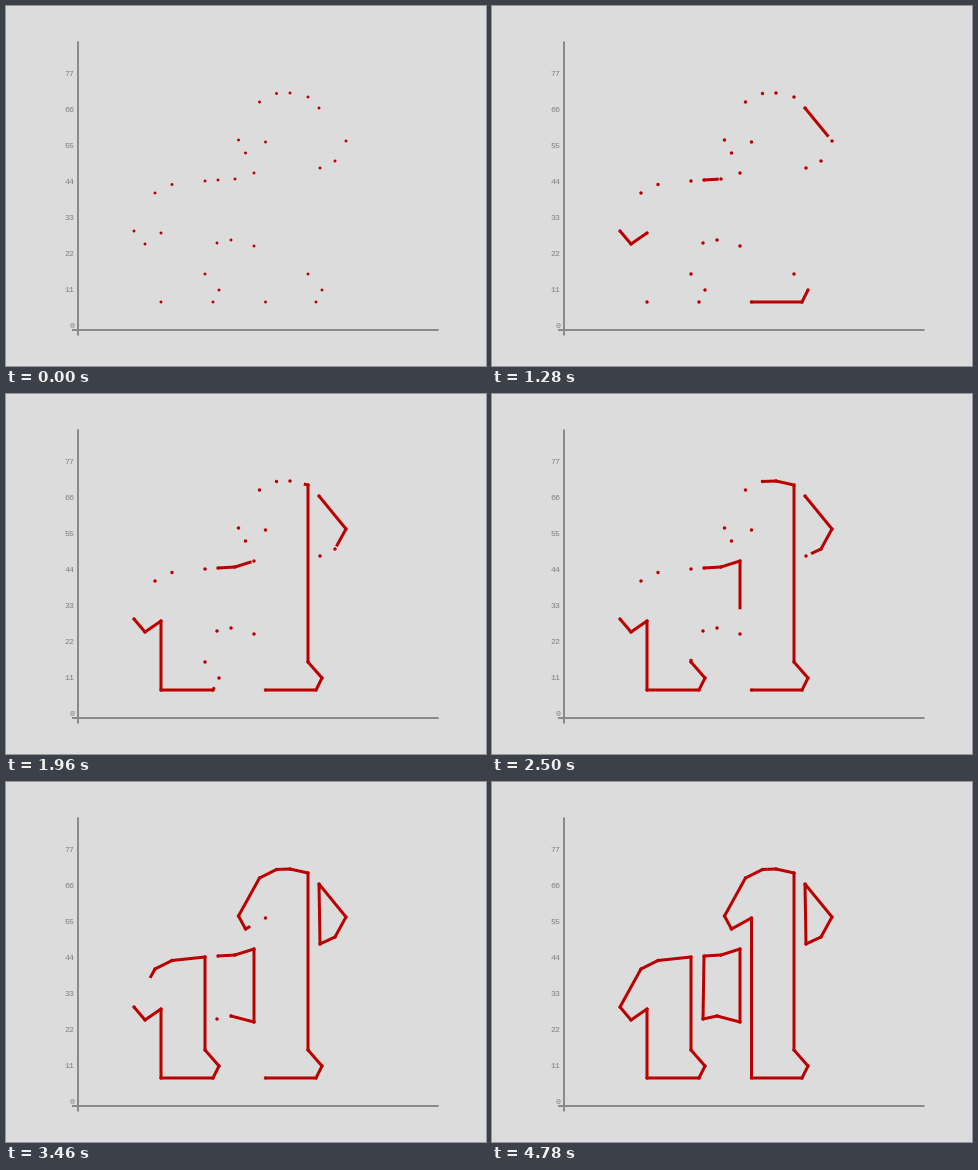
Write a matplotlib script that moves like this. It is 480x360 px and loops after 6000 ms.

```python
import matplotlib.pyplot as plt
import numpy as np
from matplotlib.animation import FuncAnimation

WIDTH, HEIGHT, DPI = 480, 360, 72
INTERVAL, LOOP = 20, 6000
START = 34.5  # frames before the drawing begins
GROW = 2      # frames before the dots swell
FLOOR = 296
RED, AXIS, LABEL, PAPER = "#bb0000", "#8a8a8a", "#808080", "#dcdcdc"


def numeral_one(left, stem, neck, chin, crown):
    """Corners of a 1 with a hooked head, from the bottom left corner."""
    foot = [(left, FLOOR), (stem + 8, FLOOR), (stem + 14, FLOOR - 12),
            (stem, FLOOR - 28)]
    top = [(stem + dx, neck - dy) for dx, dy in crown]
    tip = np.array([left - 27, neck - 2])
    head = [tip + (38, -46.5), tip + (21, -38), tip, tip + (chin, 13)]
    return np.array([*foot, *top, *head, (left, neck)], float)


small_one = numeral_one(155, 199, 227, 11, [(0, 52)])
tall_one = numeral_one(259.5, 302, 136, 7, [(0, 45), (-18, 49)])
ribbon = np.array([(212, 174), (229, 173), (248, 167),
                   (248, 240), (225, 234), (211, 237)], float)
wing = np.array([(313, 102), (340, 135), (329, 155), (314, 162)], float)

# (corners in drawing order, frames per edge)
OUTLINES = [(np.roll(small_one, 3, axis=0), 15), (tall_one, 15),
            (ribbon, 34), (wing, 34)]

fig = plt.figure(figsize=(WIDTH / DPI, HEIGHT / DPI), dpi=DPI, facecolor=PAPER)
ax = fig.add_axes([0, 0, 1, 1])
ax.set(xlim=(0, WIDTH), ylim=(HEIGHT, 0))
ax.axis("off")


def stroke(xs, ys, color, width):
    line, = ax.plot(xs, ys, color=color, lw=width, solid_capstyle="butt",
                    solid_joinstyle="round", snap=False)
    return line


stroke([72, 72], [35.5, 329.5], AXIS, 2)
stroke([66, 432.5], [324, 324], AXIS, 2)
for i in range(8):
    ax.text(68.2, 322.5 - 36 * i, str(11 * i), color=LABEL, fontsize=8.3,
            family="Liberation Mono", ha="right", va="baseline")

dots, paths = [], []
for corners, edge_frames in OUTLINES:
    dots += [ax.add_patch(plt.Circle(c, color=RED, lw=0, zorder=3))
             for c in corners]
    closed = np.vstack([corners, corners[:1]])
    paths.append((closed, edge_frames, stroke([], [], RED, 3)))


def partial(points, progress):
    """Outline drawn up to a progress counted in edges."""
    if progress <= 0:
        return points[:0]
    edge = int(progress)
    if edge >= len(points) - 1:
        return points
    a, b = points[edge:edge + 2]
    return np.vstack([points[:edge + 1], a + (b - a) * (progress - edge)])


def update(frame):
    for dot in dots:
        dot.set_radius(1.45 if frame < GROW else 1.7)
    for points, edge_frames, line in paths:
        line.set_data(*partial(points, (frame - START) / edge_frames).T)
    return dots + [line for *_, line in paths]


anim = FuncAnimation(fig, update, frames=LOOP // INTERVAL, interval=INTERVAL,
                     repeat=True, repeat_delay=0)
plt.show()
```
